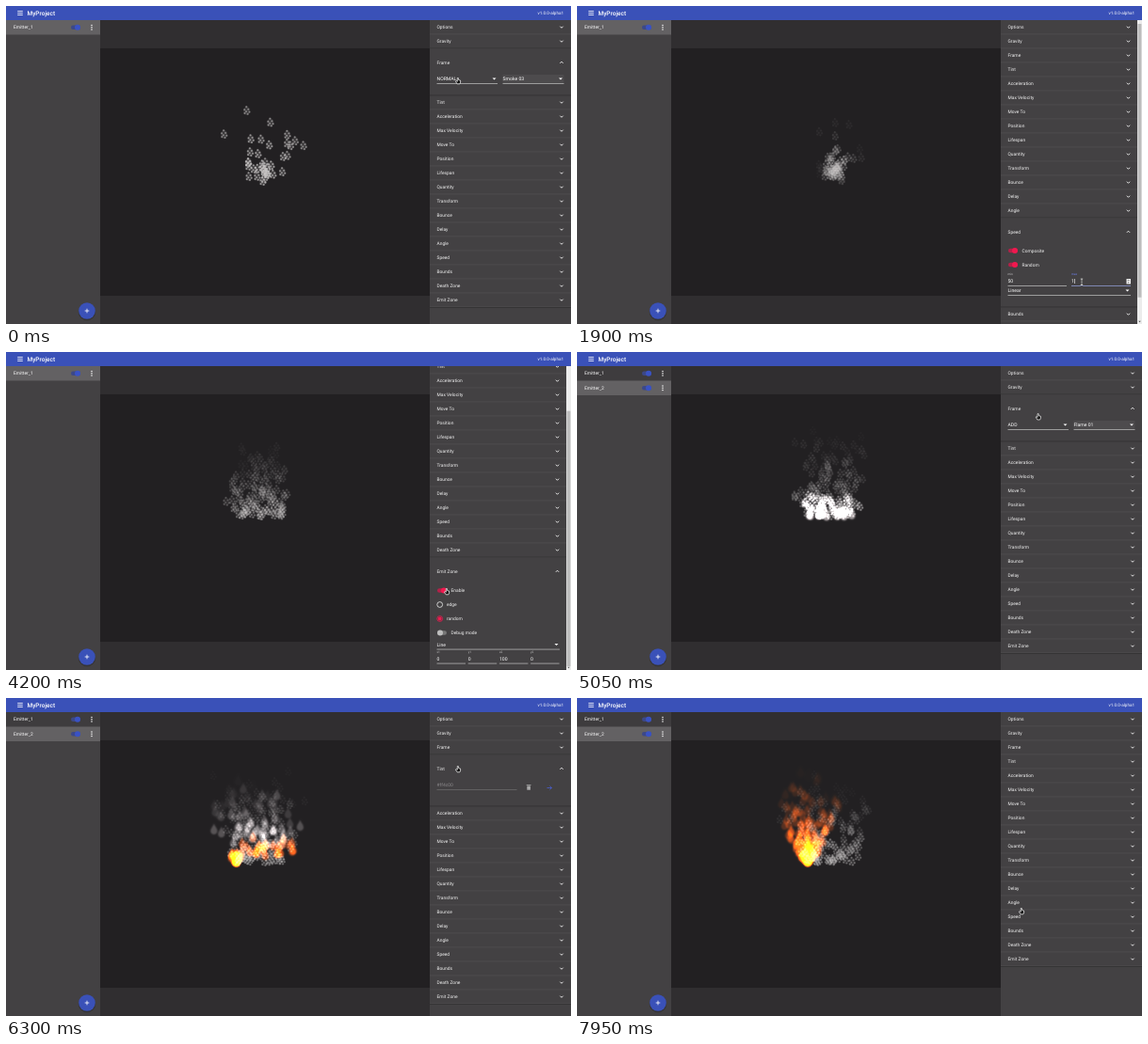
Animation of 600x338 px, one loop 8000 ms. Source, as an HTML page with a canvas:

```html
<!DOCTYPE html>
<html lang="en">
<head>
<meta charset="utf-8">
<title>Particle editor</title>
<style>
  html, body { margin: 0; width: 100%; height: 100%; overflow: hidden; background: #303030; }
  canvas { display: block; width: 100vw; height: 100vh; }
</style>
</head>
<body>
<canvas id="stage" width="600" height="338"></canvas>
<script>
const ctx = document.getElementById('stage').getContext('2d');
const LOOP = 8, STEP = 0.05;
const BLUE = '#3a51b8', PINK = '#f0194f', PINK_TRACK = '#b52049', PAPER = '#434143';
const ROWS = ['Options', 'Gravity', 'Frame', 'Tint', 'Acceleration', 'Max Velocity', 'Move To',
  'Position', 'Lifespan', 'Quantity', 'Transform', 'Bounce', 'Delay', 'Angle', 'Speed',
  'Bounds', 'Death Zone', 'Emit Zone'];
const HEIGHT = { Frame: 50, Tint: 55, Lifespan: 95, Angle: 95, Speed: 95, 'Emit Zone': 120 };
// panel name, opening time, closing time
const OPENINGS = [['Frame', -1, 0.35], ['Lifespan', 0.55, 1.5], ['Speed', 1.7, 2.3],
  ['Angle', 2.4, 3.1], ['Emit Zone', 3.4, 4.5], ['Frame', 4.8, 5.2], ['Tint', 5.35, 6.4]];
// time, x, y, shape
const POINTER = [[0, 480, 79, 'hand'], [0.3, 480, 61, 'hand'], [0.55, 474, 143, 'hand'],
  [0.75, 468, 202, 'beam'], [0.9, 536, 203, 'beam'], [1.3, 536, 203, 'beam'],
  [1.5, 478, 151, 'hand'], [1.7, 474, 233, 'hand'], [1.9, 536, 293, 'beam'], [2.2, 536, 293, 'beam'],
  [2.4, 476, 218, 'hand'], [2.55, 536, 278, 'beam'], [2.75, 476, 228, 'hand'], [3.1, 476, 228, 'hand'],
  [3.4, 474, 278, 'hand'], [3.8, 468, 254, 'hand'], [4.3, 468, 254, 'hand'], [4.5, 480, 234, 'hand'],
  [4.7, 91, 39, 'hand'], [4.85, 474, 53, 'hand'], [5.2, 500, 78, 'hand'], [5.4, 470, 76, 'hand'],
  [5.6, 488, 153, 'none'], [6.1, 488, 153, 'none'], [6.3, 480, 75, 'hand'], [6.6, 470, 270, 'hand'],
  [6.8, 463, 289, 'arrow'], [7.3, 463, 289, 'arrow'], [7.9, 472, 226, 'hand'], [8, 472, 226, 'hand']];

const clamp = (v, lo = 0, hi = 1) => Math.max(lo, Math.min(hi, v));
const ease = p => p * p * (3 - 2 * p);
const ramp = (t, from, length) => ease(clamp((t - from) / length));
const random = (i, k) => { const v = Math.sin(i * 127.1 + k * 311.7) * 43758.5453; return v - Math.floor(v); };

function rect(x, y, w, h, color) { ctx.fillStyle = color; ctx.fillRect(x, y, w, h); }
function disc(x, y, r, color) {
  ctx.fillStyle = color;
  ctx.beginPath(); ctx.arc(x, y, r, 0, 7); ctx.fill();
}
function pill(x, y, w, h, color) {
  ctx.fillStyle = color;
  ctx.beginPath(); ctx.roundRect(x, y, w, h, h / 2); ctx.fill();
}
function text(s, x, y, size = 4.9, color = '#f4f4f4', weight = 400, align = 'left') {
  ctx.font = `${weight} ${size}px Roboto, sans-serif`;
  ctx.textRendering = 'geometricPrecision';
  ctx.textAlign = align;
  ctx.textBaseline = 'alphabetic';
  ctx.fillStyle = color;
  ctx.fillText(s, x, y + size * 0.36);
}
function stroke(points, color = '#fff', width = 1) {
  ctx.strokeStyle = color;
  ctx.lineWidth = width;
  ctx.beginPath();
  points.forEach(([x, y]) => ctx.lineTo(x, y));
  ctx.stroke();
}
function triangle(x, y, r, color = '#fff') {
  ctx.fillStyle = color;
  ctx.beginPath();
  ctx.moveTo(x - r, y - r / 2); ctx.lineTo(x + r, y - r / 2); ctx.lineTo(x, y + r / 2);
  ctx.fill();
}
function toggle(x, y, on, color, track) {
  pill(x, y - 2.2, 10, 4.4, on ? track : '#777');
  disc(on ? x + 7 : x + 3, y, 3, on ? color : '#bdbdbd');
}

// ---- particles ----
function sprite(color, blur, draw) {
  const c = document.createElement('canvas');
  c.width = c.height = 64;
  const g = c.getContext('2d');
  g.filter = `blur(${blur}px)`;
  g.fillStyle = color;
  g.translate(32, 32);
  g.scale(4, 4);
  draw(g);
  return c;
}
const drawPuff = g => {
  for (const [x, y] of [[-0.4, -3.8], [-2.4, -0.8], [1.6, -1.2], [-0.6, 1.2], [2.8, 1.6], [-2.2, 3], [1, 3.8]]) {
    g.beginPath(); g.arc(x, y, 1, 0, 7); g.fill();
  }
  g.globalAlpha = 0.22;
  g.beginPath(); g.ellipse(0, 0.3, 3.4, 4.4, 0, 0, 7); g.fill();
};
const drawDrop = g => {
  g.beginPath();
  g.moveTo(0, -6);
  g.bezierCurveTo(1, -3, 3.6, -1, 3.6, 1.8);
  g.arc(0, 1.8, 3.6, 0, Math.PI);
  g.bezierCurveTo(-3.6, -1, -1, -3, 0, -6);
  g.fill();
};
const PUFF = sprite('#c8c6c6', 1.5, drawPuff);
const DROP = sprite('#b4aeae', 3, drawDrop);
const FLAME = sprite('rgb(255,76,0)', 3, drawDrop);

// Settings fixed when a particle is born
function smokeBirth(t) {
  const base = { image: PUFF, x: 274, line: 0, spread: Math.PI, life: 0.95 };
  if (t < 0.4) return { ...base, density: 0.36 };
  if (t < 1.5) return { ...base, density: 0.3, life: 0.85 };
  if (t < 2.8) return { ...base, density: 0.9 };
  if (t < 3.5) return { ...base, density: 0.9, spread: 1.05 };
  return { ...base, density: 1, spread: 1.05, x: 243, line: 50, life: 1.05 };
}
function fireBirth(t) {
  const base = { x: 243, line: 52, spread: 1.05, life: 1.05, density: 0.9 };
  if (t < 4.6) return { ...base, density: 0 };
  if (t < 4.95) return { ...base, image: PUFF };
  if (t < 5.85) return { ...base, image: DROP };
  if (t < 6.1) return { ...base, image: FLAME };
  return { ...base, image: FLAME, x: 245, line: 0, density: 1 };
}
// Settings that act on all living particles at once
const smokeLook = t => t < 0.5 ? { alpha: 0.85, fade: 0.25 } : { alpha: 0.5, fade: 0.95 };
const fireLook = () => ({ alpha: 0.75, fade: 1 });

function particles(t, birth, look, rate, seed, blend) {
  const { alpha, fade } = look(t);
  ctx.globalCompositeOperation = blend;
  for (let i = Math.floor((t - 1.2) * rate); i <= t * rate; i++) {
    const born = i / rate, age = t - born, s = birth(born);
    const rnd = k => random(i + seed, k);
    const life = s.life * (0.9 + 0.2 * rnd(1));
    if (age < 0 || age > life || rnd(2) > s.density) continue;
    const angle = (rnd(3) * 2 - 1) * s.spread, speed = 32 + 14 * rnd(4);
    const x = s.x + s.line * rnd(5) + Math.sin(angle) * speed * age;
    const y = 174 - Math.cos(angle) * speed * age - 40 * age * age;
    ctx.globalAlpha = alpha * (1 - fade * age / life);
    ctx.drawImage(s.image, x - 8, y - 8, 16, 16);
  }
  ctx.globalAlpha = 1;
  ctx.globalCompositeOperation = 'source-over';
}

// ---- left list and frame of the window ----
function emitterRow(name, y, selected) {
  rect(0, y, 100, 15.5, selected ? '#636163' : '#3e3c3e');
  text(name, 8, y + 7.5, 4.9, '#fff');
  toggle(69, y + 7.8, true, '#3a52c4', '#3c4888');
  for (const d of [-2.2, 0, 2.2]) disc(91, y + 7.8 + d, 0.75, '#fff');
}
function shell(t) {
  rect(0, 0, 600, 338, '#302e30');
  rect(100, 45, 350, 263, '#222022');
  rect(0, 15, 100, 323, PAPER);
  const second = t >= 4.6;
  emitterRow('Emitter_1', 15, !second);
  if (second) emitterRow('Emitter_2', 30.5, true);
  disc(86, 325, 9.2, 'rgba(0,0,0,.2)');
  disc(86, 324, 8.8, BLUE);
  rect(83.7, 323.6, 4.6, 0.8, '#fff');
  rect(85.6, 321.7, 0.8, 4.6, '#fff');
}
function header() {
  rect(0, 0, 600, 15, BLUE);
  for (const y of [5.2, 7.1, 9]) rect(12.2, y, 5.6, 0.8, '#fff');
  text('MyProject', 22.5, 7.3, 6.5, '#fff', 500);
  text('v1.0.0-alpha1', 592, 7.3, 4.6, '#fff', 400, 'right');
}

// ---- property panels ----
function field(value, x, y, width, label, focused) {
  if (label) text(label, x, y - 7.5, 3.2, focused ? '#6f83f0' : '#c8c8c8');
  text(value, x, y, 5.1, '#fff');
  rect(x, y + 4.7, width, 0.7, focused ? '#9aa5e4' : '#c4c4c4');
}
function select(value, x, y, width) {
  field(value, x, y, width);
  triangle(x + width - 3.5, y, 2);
}
function rangeBody(y, t, start, low, high) {
  toggle(458, y + 35, true, PINK, PINK_TRACK);
  text('Composite', 472.5, y + 35);
  toggle(458, y + 50, true, PINK, PINK_TRACK);
  text('Random', 472.5, y + 50);
  const typed = (s, from) => s.slice(0, Math.max(1, Math.floor((t - from) / 0.05)));
  field(typed(low, start + 0.1), 457.5, y + 67.5, 62.5, 'min');
  const max = typed(high, start + 0.18);
  field(max, 525, y + 67.5, 63, 'max', true);
  rect(525.3 + ctx.measureText(max).width, y + 65, 0.6, 5, '#fff');
  rect(583.5, y + 65, 4.5, 5.5, '#eee');
  triangle(585.7, y + 69, 1, '#444');
  stroke([[584.8, y + 67], [585.7, y + 66], [586.6, y + 67]], '#444', 0.6);
  select('Linear', 457.5, y + 77.5, 130.5);
}
function radio(label, y, on) {
  ctx.strokeStyle = on ? PINK : '#eee';
  ctx.lineWidth = 0.8;
  ctx.beginPath(); ctx.arc(460.7, y, 2.9, 0, 7); ctx.stroke();
  if (on) disc(460.7, y, 1.9, PINK);
  text(label, 468, y);
}
function zoneBody(y) {
  toggle(458, y + 35.5, true, PINK, PINK_TRACK);
  text('Enable', 472.5, y + 35.5);
  radio('edge', y + 50.5, false);
  radio('random', y + 65.5, true);
  toggle(458, y + 80.5, false);
  text('Debug mode', 472.5, y + 80.5);
  select('Line', 457.5, y + 93, 130.5);
  ['0', '0', '100', '0'].forEach((v, i) =>
    field(v, 457.5 + 33.2 * i, y + 108, 30.5, ['x1', 'y1', 'x2', 'y2'][i]));
}
function panelBody(name, y, t, start) {
  if (name === 'Frame') {
    select(t > 4 ? 'ADD' : 'NORMAL', 457.5, y + 32.5, 64.5);
    rect(527.5, y + 28, 65, 9, 'rgba(255,255,255,.05)');
    select(t > 4.95 ? 'Flame 01' : 'Smoke 03', 527.5, y + 32.5, 65);
  } else if (name === 'Tint') {
    text(t < 5.85 ? '#a09494' : '#ff4c00', 457.5, y + 32.5, 4.9, '#8d8b8d');
    rect(457.5, y + 37, 85, 0.6, '#777');
    rect(553.3, y + 33.5, 3.6, 4.2, '#aaa');
    rect(552.7, y + 32.2, 4.8, 0.8, '#aaa');
    stroke([[574.5, y + 35.5], [579.5, y + 35.5]], '#4a5fd0', 0.8);
    stroke([[577.5, y + 33.5], [579.5, y + 35.5], [577.5, y + 37.5]], '#4a5fd0', 0.8);
  } else if (name === 'Emit Zone') zoneBody(y);
  else {
    const [low, high] = { Lifespan: ['900', '1100'], Speed: ['50', '100'], Angle: ['210', '330'] }[name];
    rangeBody(y, t, start, low, high);
  }
}
function gradient(x, y, w, h, horizontal, colors) {
  const g = horizontal ? ctx.createLinearGradient(x, 0, x + w, 0) : ctx.createLinearGradient(0, y, 0, y + h);
  colors.forEach((c, i) => g.addColorStop(i / (colors.length - 1), c));
  rect(x, y, w, h, g);
}
function colorPicker(t) {
  const orange = t >= 5.85, move = ramp(t, 5.8, 0.15);
  const hex = orange ? '#ff4c00' : '#a09494';
  rect(457, 97, 71.5, 72, 'rgba(0,0,0,.3)');
  rect(457.5, 97, 70.5, 70.5, '#fff');
  gradient(457.5, 97, 70.5, 39, true, ['#fff', orange ? '#ff4c00' : '#f20']);
  gradient(457.5, 97, 70.5, 39, false, ['rgba(0,0,0,0)', '#000']);
  ctx.strokeStyle = '#fff'; ctx.lineWidth = 0.6;
  ctx.beginPath(); ctx.arc(463 + 62 * move, 112 - 13 * move, 1.9, 0, 7); ctx.stroke();
  disc(464, 143, 1.8, hex);
  gradient(471, 141.5, 52, 3, true, ['#f00', '#ff0', '#0f0', '#0ff', '#00f', '#f0f', '#f00']);
  disc(471 + 3 * move, 143, 1.9, '#f6f6f6');
  ctx.strokeStyle = '#5366c4'; ctx.lineWidth = 0.7;
  ctx.strokeRect(462.5, 149.8, 50.5, 7);
  rect(480.5, 151, 14.5, 4.8, '#3574e0');
  text(hex, 487.8, 153.2, 3.8, '#fff', 400, 'center');
  text('HEX', 487.8, 161.8, 3.4, '#999', 400, 'center');
  triangle(520, 158.5, 1.5, '#333');
  stroke([[518.5, 155.8], [520, 154.3], [521.5, 155.8]], '#333', 0.8);
}
function properties(t) {
  const open = {};
  for (const [name, from, to] of OPENINGS) {
    const amount = ramp(t, from, 0.1) * (1 - ramp(t, to, 0.1));
    if (amount > 0) open[name] = { amount, from };
  }
  const rowHeight = name => open[name] ? 15 + (HEIGHT[name] - 15) * open[name].amount : 15;
  const total = ROWS.reduce((sum, name) => sum + rowHeight(name), 0);
  const overflow = Math.max(0, total - 323);
  const scroll = overflow * ramp(t, 3.5, 0.2) * (t < 4.8);
  const chevronX = overflow ? 585.5 : 590;

  ctx.save();
  ctx.beginPath(); ctx.rect(450, 15, 150, 323); ctx.clip();
  rect(450, 15, 150, 323, PAPER);
  let y = 15 - scroll;
  for (const name of ROWS) {
    const h = rowHeight(name), state = open[name], amount = state ? state.amount : 0;
    const mid = y + 7.5 + 7.5 * amount;
    if (state) {
      ctx.save();
      ctx.beginPath(); ctx.rect(450, y, 150, h); ctx.clip();
      panelBody(name, y, t, state.from);
      ctx.restore();
      rect(450, y - 0.5, 150, 0.8, 'rgba(0,0,0,.35)');
    }
    text(name, 457.5, mid);
    const tip = amount > 0.5 ? -0.8 : 0.8;
    stroke([[chevronX - 1.6, mid - tip], [chevronX, mid + tip], [chevronX + 1.6, mid - tip]], '#fff', 0.9);
    y += h;
    rect(450, y - 0.4, 150, 0.7, state ? 'rgba(0,0,0,.35)' : 'rgba(255,255,255,.08)');
  }
  rect(450, y, 150, 1, 'rgba(0,0,0,.25)');
  if (overflow) {
    const scale = 315 / total;
    rect(595, 15, 5, 323, '#ececec');
    rect(595.6, 19 + scroll * scale, 3.8, 323 * scale, '#bcbcbc');
    triangle(597.5, 335.5, 1.3, '#555');
  }
  if (t >= 5.5 && t < 6.2) colorPicker(t);
  ctx.restore();
}

// ---- pointer ----
function pointer(t) {
  const n = POINTER.findIndex(k => k[0] > t);
  const a = POINTER[n - 1], b = POINTER[n], p = ramp(t, a[0], b[0] - a[0]);
  const shape = p < 0.6 ? a[3] : b[3];
  if (shape === 'none') return;
  ctx.save();
  ctx.translate(a[1] + (b[1] - a[1]) * p, a[2] + (b[2] - a[2]) * p);
  if (shape === 'beam') {
    for (const [color, width] of [['#111', 1.7], ['#fff', 0.8]]) {
      stroke([[0, -3], [0, 3.5]], color, width);
      stroke([[-1.3, -3], [1.3, -3]], color, width);
      stroke([[-1.3, 3.5], [1.3, 3.5]], color, width);
    }
  } else {
    const outline = shape === 'hand'
      ? [[-0.7, -2.5], [0.4, -2.5], [0.6, -0.4], [2.5, 0], [2.7, 2], [1.9, 3.8], [-0.9, 3.8], [-2.6, 1], [-1.8, 0.5], [-0.7, 1.3]]
      : [[0, -3], [0, 3], [1.3, 1.9], [2.3, 4], [3.2, 3.5], [2.3, 1.5], [4, 1.3]];
    ctx.beginPath();
    outline.forEach(([x, y]) => ctx.lineTo(x, y));
    ctx.closePath();
    ctx.fillStyle = '#111'; ctx.fill();
    ctx.strokeStyle = '#fff'; ctx.lineWidth = 0.7; ctx.stroke();
  }
  ctx.restore();
}

function draw(now) {
  const t = Math.floor(now / 1000 % LOOP / STEP + 1e-6) * STEP % LOOP;
  shell(t);
  particles(t, smokeBirth, smokeLook, 130, 0, 'source-over');
  particles(t, fireBirth, fireLook, 130, 5000, 'lighter');
  properties(t);
  header();
  pointer(t);
}
function tick() {
  draw(performance.now());
  requestAnimationFrame(tick);
}
tick();
</script>
</body>
</html>
```
